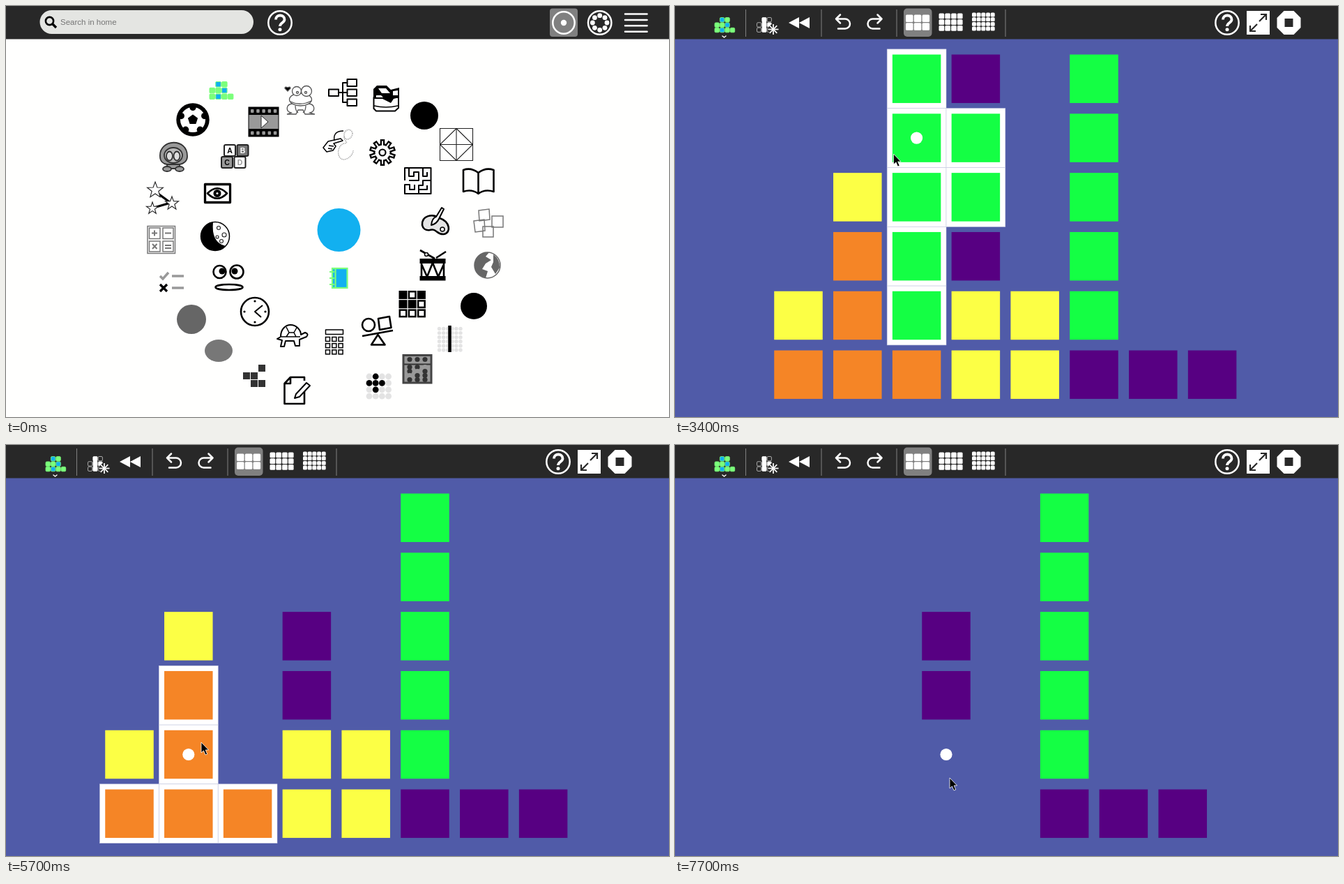
Write an HTML page that moves like this. It is 951 by 589 pixels and loops after 8000 ms.

```html
<!DOCTYPE html>
<html lang="en">
<head>
<meta charset="utf-8">
<title>Block puzzle</title>
<style>
html, body { margin: 0; width: 100%; height: 100%; overflow: hidden; background: #fffffe; }
svg { display: block; width: 951px; height: 589px; }
text { font-family: "Liberation Sans", Arial, sans-serif; }
.k { fill: none; stroke: #000; stroke-width: 2.6; stroke-linejoin: round; }
.w { fill: #fff; stroke: #000; stroke-width: 2.6; stroke-linejoin: round; }
.t { fill: none; stroke: #222; stroke-width: 1.1; }
.g { fill: none; stroke: #777; stroke-width: 1.5; }
.wl { fill: none; stroke: #fff; stroke-width: 2.5; stroke-linecap: round; stroke-linejoin: round; }
.bold { stroke-width: 3.3; }
.mid { stroke-width: 2; }
.fine { stroke-width: 1.5; }
</style>
</head>
<body>
<svg viewBox="0 0 951 589">
  <defs>
    <g id="help">
      <circle class="wl" r="16.7"/>
      <path d="M-6-4.500C-6-12.500 6.500-12.500 6.500-4.500 6.500 0 0 0 0 5" fill="none" stroke="#fff" stroke-width="3.800"/>
      <circle cy="9.800" r="2.500" fill="#fff"/>
    </g>
    <path id="arrow" d="M0 0V15L3.5 12 6 18 8.7 17 6.2 11H10.6Z" stroke="#fff" stroke-width=".8"/>
    <path id="bigArrow" d="M0 0H17L12.5 5.5 20 13.5 14.5 19 6 11 0 17Z" stroke="#fff" stroke-width="1.3"/>
  </defs>

  <g id="home">
    <rect width="951" height="589" fill="#fffffe"/>
    <rect width="951" height="47.5" fill="#282828"/>
    <rect x="48.5" y="6" width="306.5" height="34" rx="17" fill="#e4e5e2"/>
    <g fill="none" stroke="#000"><circle cx="62.5" cy="21.5" r="5.6" stroke-width="2.6"/><path d="M67 26L72 31" stroke-width="3.4"/></g>
    <text x="78" y="27" font-size="11.5" fill="#757575">Search in home</text>
    <use href="#help" x="393" y="24"/>
    <rect x="780" y="3.5" width="40" height="40.5" rx="4" fill="#808080"/>
    <circle class="wl" cx="800" cy="24" r="15.7"/><circle cx="800" cy="24" r="4.2" fill="#fff"/>
    <circle class="wl" cx="851.7" cy="24" r="16.7"/>
    <path class="wl" d="M888 11.500H919.500M888 20H919.500M888 28.300H919.500M888 36.700H919.500"/>

    <rect id="hover" x="282" y="92" width="51" height="50.500" rx="4" fill="#d2d2d2"/>
    <circle cx="477.500" cy="321" r="31" fill="#12b0f0"/>
    <g stroke="#7bff7b" stroke-width="2.2"><rect x="468" y="376" width="21.500" height="28" fill="#12b0f0"/><path d="M472.500 377V403M464 381H471M464 390H471M464 399H471" fill="none"/></g>

    <!-- outer ring -->
    <circle cx="600" cy="157" r="20"/>
    <circle cx="671" cy="430" r="19"/>
    <circle cx="266" cy="449" r="21" fill="#666"/>
    <ellipse cx="305" cy="494" rx="20" ry="16" fill="#777"/>
    <circle cx="268" cy="163" r="23.700"/><circle cx="268" cy="163" r="18" fill="#fff"/>
    <g stroke="#555" stroke-width="1.300" fill="#fff">
      <path d="M411 140C401 141 401 151 409 153L403 155H416L419 149H426L429 155H443L436 153C444 151 444 141 434 140Z"/>
      <path d="M415 143Q415 150 419 153M430 143Q430 150 426 153" fill="none"/>
      <ellipse cx="422.500" cy="134" rx="16" ry="9"/><circle cx="417" cy="122" r="6.500"/><circle cx="431" cy="122" r="7.500"/>
      <path d="M408 137Q422 144 438 136" fill="none"/>
      <circle cx="418" cy="124" r="1.500"/><circle cx="430" cy="124" r="1.500"/>
      <path d="M404 122L400 118Q400 115 404 117 408 115 408 118Z" fill="#000"/>
    </g>
    <path class="k mid" d="M463 119.500H477V129H463ZM489.500 105H503V115H489.500ZM489.500 119.500H503V129H489.500ZM489.500 133.500H503V143H489.500ZM477 124H489.500M489.500 110H483V138H489.500"/>
    <path class="w mid" d="M527.500 131H563V146L558 150.500H531L527.500 147Z"/>
    <path d="M527 133V119L532 114H546L552 120 564 117V131L556 133 552 139 540 133Z"/>
    <path d="M534 118H545L551 125H539ZM555 122L562 121V128H555ZM531 128H538L541 131H531Z" fill="#fff"/>
    <path class="k fine" d="M528 143Q545 147 562 143"/>
    <path class="t" d="M622.500 175.500H669.500V221.500H622.500ZM646 175.500L669.500 198.500 646 221.500 622.500 198.500ZM646 175.500V221.500M622.500 198.500H669.500"/>
    <path class="k" d="M677.500 239Q667 231 656 235V266Q668 262 677.500 269 687 262 699.500 266V235Q688 231 677.500 239V268"/>
    <path class="g" style="fill:#fff" d="M678 293L693 291 694 306 679 308ZM697 301H713V317H697ZM671 308L686 306 687 322 673 324ZM684 316H699V331H684Z"/>
    <circle cx="690.500" cy="371.500" r="18.500" fill="#fff" stroke="#666" stroke-width="1.500"/>
    <path d="M674 362Q680 352 693 353L688 359 696 364 688 369 683 377 691 380 688 390Q672 385 672 371ZM699 356Q709 363 708 375L702 384 696 374 699 367Z" fill="#666"/>
    <rect x="570" y="500.500" width="40" height="39.500" fill="#999" stroke="#444" stroke-width="3"/>
    <path d="M571 513.500H609" stroke="#333" stroke-width="2"/>
    <path class="k" d="M428 549V570H399.500V541L408 532H428V537M408 532V541H399.500"/><path class="w mid" d="M416 556L431 540 436 544 421 560 414 562Z"/>
    <path d="M221 387L225 391 233 382M238 387H255M238 404H255" fill="none" stroke="#999" stroke-width="3.400"/><path class="k bold" d="M221 399L231 409M231 399L221 409"/>
    <path class="g" d="M203 315.500H242.500V354.500H203ZM205.500 318H221V333.500H205.500ZM225 318H240V333.500H225ZM205.500 337H221V352H205.500ZM225 337H240V352H225Z"/>
    <path class="g mid" d="M209 325.500H217M213 321.500V329.500M228 325.500H237M210 341L216.500 348M216.500 341L210 348M228 343H237M228 347H237"/>
    <path class="k bold" d="M217 268L236 282 212 289"/>
    <g stroke="#333" stroke-width="1.800" fill="#999">
      <path d="M231 224H249V233H231Z"/>
      <ellipse cx="231" cy="233.500" rx="6" ry="3.500"/><ellipse cx="249" cy="233.500" rx="6" ry="3.500"/>
      <path d="M221 216C219 190 261 188 260 216 260 222 255 226 249 227H231C225 226 221 222 221 216Z"/>
      <ellipse cx="240" cy="214" rx="13" ry="11" fill="#bbb"/>
      <ellipse cx="234.500" cy="215" rx="4.500" ry="6.500" fill="#ddd"/><ellipse cx="245" cy="215" rx="4.500" ry="6.500" fill="#ddd"/>
    </g>

    <!-- inner ring -->
    <rect x="347.500" y="144.500" width="44" height="43"/><rect x="348.500" y="156" width="42" height="20" fill="#999"/>
    <path d="M366 157L376 166 366 175Z" fill="#fff" stroke="#222"/>
    <path d="M497 183C496 174 484 176 485 187 485 195 493 196 485 197 474 200 474 219 484 220 491 220 498 213 498 207M485 187C488 195 496 190 497 183" fill="none" stroke="#aaa" stroke-width="1.500" stroke-dasharray="1.500 1"/>
    <path class="w fine" d="M455 203L462 194 480 190 483 193 470 197 473 201 469 207 460 209Z"/><path class="k fine" d="M471 193C469 182 476 179 484 179M463 200L470 201M462 204L468 205"/>
    <path class="k mid" d="M572 250V232H609.500V269H572V256H579V263H586V256M578 232V244H585V238H592V250H578M598 232V244H604V238M609 250H598V257H592V263H604V257M592 269V263"/>
    <path class="w" d="M597 314C596 300 612 297 622 304 637 309 639 325 628 327 618 328 617 318 608 321 602 322 598 319 597 314Z" style="fill:#e5e5e5"/><circle class="w fine" cx="626" cy="320" r="3"/><path class="w mid" d="M610 314Q611 304 617 302L625 289 628 291 621 305Q618 312 610 314Z"/>
    <path class="k" d="M596 365V391H628V365ZM596 370L604 388 612 368 620 388 628 370M594 350L615 362M631 352L617 361"/><path d="M593.500 362H630.500V369H593.500ZM593.500 387H630.500V393.500H593.500Z"/><circle class="w fine" cx="603" cy="356" r="2.500"/>
    <circle class="k" cx="520" cy="457" r="9"/><path class="k" d="M534 448L550 445 552.500 461 536 464ZM511 473L555 465M533.500 471L524 485.500H543.500Z"/>
    <path class="k fine" d="M458.500 464H483.500V470.500H458.500Z"/>
    <path class="w mid" d="M394 474C394 462 402 457 408 457 417 457 423 465 423 471L429 468Q435 470 431 474L421 478V487H415L413 480H401L399 488H394L396 479 389 477Z"/><path class="k fine" d="M395 474H422M402 460L406 468H413L417 461M406 468L402 474M413 468L416 474"/>
    <circle class="k" cx="357" cy="438" r="20"/><path class="k mid" d="M368 429L357 438 366 446"/>
    <g class="k"><circle cx="306.500" cy="381" r="9"/><circle cx="331" cy="381" r="9.500"/><ellipse cx="320" cy="403" rx="19.500" ry="4"/></g><circle cx="310" cy="380" r="4.500"/><circle cx="328" cy="380" r="4.500"/>
    <circle class="w fine" cx="300" cy="330" r="20.500"/><path d="M297 309.500A20.500 20.500 0 1 0 315 344Q294 339 297 309.500Z"/><g class="t"><circle cx="305" cy="318" r="2.500"/><circle cx="313" cy="328" r="3"/><circle cx="303" cy="331" r="2"/><circle cx="309" cy="337" r="2.500"/></g>
    <path class="k bold" d="M285.500 255.500H321.500V281.500H285.500Z"/><path class="k" d="M289 268.500Q303 254 317 268.500 303 283 289 268.500Z"/><circle cx="303" cy="268.500" r="5.500"/><circle cx="303" cy="268.500" r="1.500" fill="#fff"/>
  </g>

  <g id="game">
    <rect width="951" height="589" fill="#505ba8"/>
    <rect width="951" height="47.500" fill="#282828"/>
    <path d="M101.500 5V44M210 5V44M318 5V44M474 5V44" stroke="#808080"/>
    <rect id="active" x="328" y="3.500" width="40.500" height="40.500" rx="5" fill="#808080"/>
    <path d="M163 24L178 16V32ZM178 24L193 16V32Z" fill="#fff"/>
    <path id="undo" class="wl" d="M231 18.500H244A7 7 0 0 1 244 32.500H234M237 12.500L231 18.500 237 24.500"/>
    <use href="#undo" transform="matrix(-1 0 0 1 527.500 0)"/>
    <use href="#help" x="792" y="24"/>
    <path d="M820 7H853V41H820Z" fill="#fff"/>
    <path d="M838 22L848 12M840 12H848V20M835 26L825 36M825 28V36H833" fill="none" stroke="#282828" stroke-width="2.200"/>
    <path d="M873.500 7H887.500L897.500 17V31L887.500 41H873.500L863.500 31V17Z" fill="#fff"/><path d="M874.500 18H886.500V30H874.500Z" fill="#282828"/>
    <g id="badge"></g>
    <g id="board"></g>
  </g>
  <use id="pointer" href="#arrow"/>
</svg>
<script>
const $ = id => document.getElementById(id);
const range = n => [...Array(n).keys()];
const rect = (x, y, w, h, fill, rest = '') =>
  `<rect x="${x}" y="${y}" width="${w}" height="${h}" fill="${fill}" ${rest}/>`;
const dot = (x, y, r, fill, rest = '') => `<circle cx="${x}" cy="${y}" r="${r}" fill="${fill}" ${rest}/>`;
const grid = (cols, rows, draw) =>
  range(cols * rows).map(i => draw(i % cols, Math.floor(i / cols))).join('');
const ring = (n, r, draw, turn = -90) => range(n).map(i => {
  const a = (turn + i * 360 / n) * Math.PI / 180;
  return draw(r * Math.cos(a), r * Math.sin(a), i);
}).join('');
const star = (x, y, n, r, r2, attrs) => {
  const pts = range(2 * n).map(i => {
    const a = i * Math.PI / n - Math.PI / 2, q = i % 2 ? r2 : r;
    return `${(x + q * Math.cos(a)).toFixed(1)},${(y + q * Math.sin(a)).toFixed(1)}`;
  });
  return `<polygon points="${pts.join(' ')}" ${attrs}/>`;
};
const spokes = (cx, cy, n, r, color, width) => ring(n, r, (x, y) =>
  `<path d="M${cx} ${cy}l${x} ${y}" stroke="${color}" stroke-width="${width}"/>`);

// Stepped block pile: '#' main cell, 'o' other cell
const pile = (x, y, pitch, size, main, other, rest) => grid(4, 3, (c, r) => {
  const kind = [' #o ', 'oo# ', 'o#oo'][r][c];
  return kind === ' ' ? '' : rect(x + c * pitch, y + r * pitch, size, size, kind === '#' ? main : other, rest);
});

const thinStar = 'class="t" style="fill:#fff"';
$('home').insertAdjacentHTML('beforeend', [
  pile(292, 108.5, 8.8, 7.5, '#12b0f0', '#7bff7b', 'stroke="#7bff7b" stroke-width="1" rx="1"'),
  ring(8, 10.3, (x, y) => dot(851.7 + x, 24 + y, 3.4, '#fff')),
  star(268, 163, 5, 7.5, 6, ''),
  ring(5, 17.5, (x, y) => dot(268 + x, 163 + y, 4.6, '#000')),
  grid(5, 2, (c, r) => rect(351 + c * 8.2, 148 + r * 31.5, 4.5, 5, '#999', 'rx="1"')),
  // gear
  spokes(540, 210, 10, 19, '#000', 6.5), dot(540, 210, 13, '#000'),
  spokes(540, 210, 10, 16.5, '#fff', 2), dot(540, 210, 10.5, '#fff'),
  dot(540, 210, 4.5, 'none', 'stroke="#000" stroke-width="2.2"'),
  star(214, 264, 5, 12, 5, thinStar),
  star(238, 283, 5, 10, 4, thinStar),
  star(210, 290, 5, 9, 3.6, thinStar),
  grid(3, 3, (c, r) => rect(563.5 + c * 13.2, 408 + r * 13.2, 12, 12, '#000') +
    ('010001111'[r * 3 + c] === '1' ? rect(566 + c * 13.2, 410.5 + r * 13.2, 7, 7, '#fff') : '')),
  grid(6, 6, (c, r) => dot(621.5 + c * 6.1, 462.5 + r * 6.1, 2.7, '#e3e3e3')),
  '<path d="M636.5 458V496" stroke="#000" stroke-width="4.5"/>',
  grid(4, 4, (c, r) => dot(521 + c * 9.2, 531 + r * 9.4, 4.4,
    (c === 1 && r < 3) || (r === 1 && c < 3) ? '#000' : '#e3e3e3')),
  // abacus beads
  grid(3, 5, (c, r) => dot(579 + c * 11, 506.5 + r * 6 + (r ? 5 : 0), 3.6, (c + r) % 4 === 3 ? '#999' : '#333')),
  grid(3, 3, (c, r) => rect(458.5 + c * 9.3, 474.5 + r * 9.2, 6, 6, '#fff', 'stroke="#000" stroke-width="1.5"')),
  grid(3, 3, (c, r) => ['  #', '## ', ' ##'][r][c] === '#' ? rect(340 + c * 11, 514 + r * 11, 10, 10, '#333') : ''),
  ring(4, 15, (x, y) => dot(357 + x, 438 + y, 1.6, '#000')),
  ['A', 'B', 'C', 'D'].map((s, i) => {
    const x = (i < 2 ? 313 : 309) + i % 2 * 18.5, y = i < 2 ? 199 : 216;
    return rect(x, y, 16, 16, ['#fff', '#777', '#999', '#fff'][i], 'rx="2" stroke="#222" stroke-width="2"') +
      `<text x="${x + 8}" y="${y + 12}" text-anchor="middle" font-size="10.5" font-weight="bold" fill="${['#000', '#fff', '#000', '#999'][i]}">${s}</text>`;
  }).join('')
].join(''));

const sizes = [[3, 2, 331, 12.5, 11.8, 10.5], [4, 3, 378.5, 10.5, 8.8, 7.7], [5, 4, 426, 9.5, 6.7, 5.9]];
$('badge').insertAdjacentHTML('beforebegin',
  sizes.map(([n, m, x, y, pitch, s]) =>
    grid(n, m, (c, r) => rect(x + c * pitch, y + r * pitch, s, s, '#fff', 'rx="1.5"'))).join('') +
  pile(117.5, 16.5, 7.3, 6.3, '#fff', '#282828', 'stroke="#bbb" stroke-width=".9" rx="1.5"') +
  rect(124.8, 16.5, 6.3, 21, '#fff', 'rx="1"') + dot(141, 33.5, 7.5, '#282828') +
  spokes(141, 33.5, 8, 7.5, '#fff', 1.7));

// Board: one string per column, top to bottom
const CELL = 84.8, LEFT = 134.6, TOP = 61.9, SIZE = 69.5;
const colors = { g: '#14ff44', o: '#f58526', y: '#fcff45', p: '#570082' };
const start = ['....yo', '..yooo', 'gggggo', 'pggpyy', '....yy', 'gggggp', '.....p', '.....p'];
const key = (c, r) => c + ',' + r;
const flood = (b, c, r, set = new Set()) => {
  const s = b[c]?.[r];
  if (!s || s === '.') return set;
  set.add(key(c, r));
  for (const [i, j] of [[c + 1, r], [c - 1, r], [c, r + 1], [c, r - 1]])
    if (b[i]?.[j] === s && !set.has(key(i, j))) flood(b, i, j, set);
  return set;
};
const remove = (b, c, r) => {
  const set = flood(b, c, r);
  return b.map((col, i) => [...col].map((s, j) => set.has(key(i, j)) ? '.' : s).join(''));
};
const fall = b => b.map(col => col.replaceAll('.', '').padStart(6, '.'));
const squeeze = b => b.filter(col => /\w/.test(col));

const first = remove(start, 2, 2), second = remove(fall(first), 1, 4);
const packed = squeeze(fall(second));
const stages = [[0, start], [4500, first], [4700, fall(first)], [6400, second],
  [6700, fall(second)], [6900, packed], [7700, remove(packed, 2, 4)]];
const shrink = [[0, 1], [4300, .67], [4400, .33], [4500, 1], [6200, .67], [6300, .33], [6400, 1], [7500, .67], [7700, 1]];
const moves = [[0, -50, -50], [1000, 141, 30], [1100, 196, 57], [1200, 252, 88], [1300, 270, 98],
  [1600, 286, 110], [1700, 295, 119], [1900, 301, 120], [2000, 304, 120],
  [3100, 307, 150], [3200, 310, 180], [3300, 312, 202], [3400, 313.5, 212],
  [3600, 319, 228], [3700, 328, 248], [3800, 336, 263], [4100, 330.5, 266.5],
  [5200, 326, 295], [5300, 316, 335], [5400, 301, 372], [5500, 291, 402], [5600, 284, 419], [5700, 280, 426],
  [6900, 284, 429], [7000, 300, 437], [7100, 326, 448], [7200, 354, 461], [7300, 375, 470], [7400, 389, 475], [7500, 394, 477]];
const at = (list, t) => list.findLast(e => e[0] <= t);

function drawBoard(t, px, py) {
  const b = at(stages, t)[1], scale = at(shrink, t)[1];
  const left = LEFT + (8 - b.length) * CELL / 2;
  const [dc, dr] = t < 3100 ? [7, 0] : [Math.floor((px - left) / CELL), Math.floor((py - TOP) / CELL)];
  const picked = flood(b, dc, dr);
  let back = '', front = '';
  b.forEach((col, c) => [...col].forEach((s, r) => {
    if (s === '.') return;
    const x = left + c * CELL, y = TOP + r * CELL, on = picked.has(key(c, r));
    const size = on ? SIZE * scale : SIZE, inset = (CELL - size) / 2;
    if (on && scale === 1) back += rect(x, y, CELL, CELL, '#fff', 'stroke="#c9cce2" stroke-width=".6"');
    front += rect(x + inset, y + inset, size, size, colors[s]);
  }));
  return back + front + dot(left + (dc + .5) * CELL, TOP + (dr + .5) * CELL, 8.6, '#fff');
}

const show = (id, on) => { $(id).style.display = on ? '' : 'none'; };
let last = -1;
function frame() {
  const t = Math.floor(performance.now() % 8000 / 100) * 100;
  if (t !== last) {
    last = t;
    const [, x, y] = at(moves, t), ready = t >= 2400;
    show('home', t < 2200);
    show('game', t >= 2200);
    show('hover', t >= 1600);
    show('active', ready);
    $('badge').innerHTML = ready
      ? pile(57, 16.5, 7.4, 6.5, '#12b0f0', '#7bff7b', 'stroke="#7bff7b" stroke-width=".8" rx="1.5"') +
        '<path class="wl fine" d="M68 43L70.5 45 73 43"/>'
      : pile(57, 16.5, 7.4, 6.5, '#fff', '#000', 'stroke="#000" stroke-width=".8" rx="1.5"');
    $('board').innerHTML = ready ? drawBoard(t, x, y) : '';
    $('pointer').setAttribute('href', t >= 2200 && t < 3100 ? '#bigArrow' : '#arrow');
    $('pointer').setAttribute('transform', `translate(${x} ${y})`);
  }
  requestAnimationFrame(frame);
}
frame();
</script>
</body>
</html>
```
